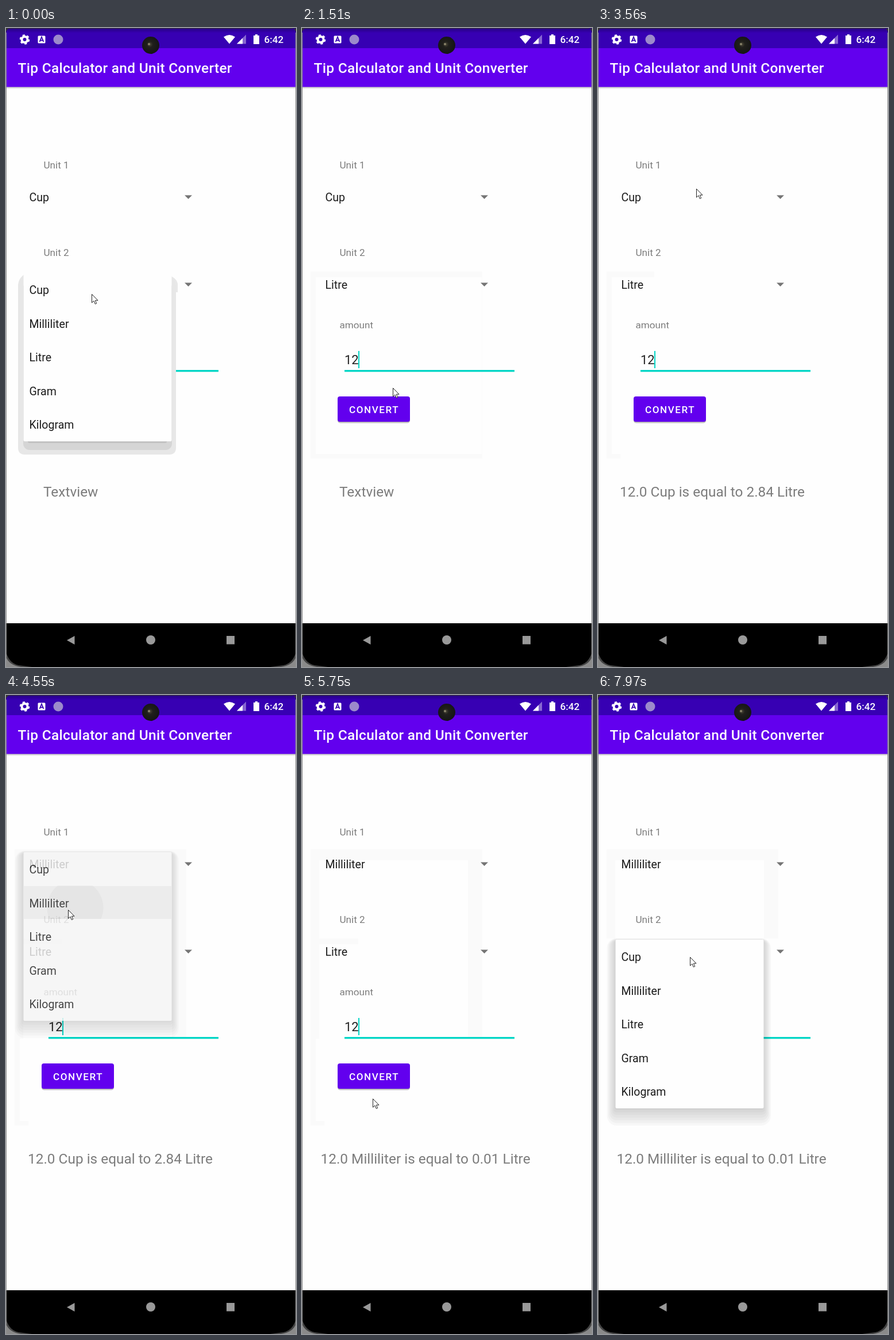
These frames come from a looping animation (505 by 1110 pixels, 8000 ms). An HTML page:

```html
<!DOCTYPE html>
<html lang="en">
<head>
<meta charset="utf-8">
<title>Unit converter</title>
<style>
  html, body { margin: 0; width: 100%; height: 100%; overflow: hidden; background: #fefefe; }
  svg { display: block; }
  text { font-family: Roboto, sans-serif; white-space: pre; }
  .title { font-size: 24.46px; font-weight: 500; letter-spacing: .0125em; fill: #fff; }
  .clock { font-size: 17.1px; font-weight: 500; fill: #fff; }
  .label { font-size: 17.1px; fill: #7c7c7c; }
  .item { font-size: 19.57px; fill: #1c1c1c; }
  .result { font-size: 24.4px; fill: #7c7c7c; }
  .amount { font-size: 22px; fill: #222; }
  .button { font-size: 17.1px; font-weight: 500; letter-spacing: .0892em; fill: #fff; }
  .trace { fill: #fafafa; fill-rule: evenodd; }
  .blank { fill: #fefefe; }
  .soft rect { fill: #000; fill-opacity: .028; }
</style>
</head>
<body>
<svg id="stage" width="100%" height="100%" viewBox="0 0 505 1110">
  <defs>
    <linearGradient id="drop" x2="0" y2="1">
      <stop stop-color="#b8b8b8"/><stop offset="1" stop-color="#fefefe"/>
    </linearGradient>
    <linearGradient id="status" x2="0" y2="1">
      <stop stop-color="#250080"/><stop offset=".25" stop-color="#3700b3"/>
    </linearGradient>
    <radialGradient id="lens" cx=".45" cy=".45">
      <stop stop-color="#4a4638"/><stop offset=".35" stop-color="#201f1b"/><stop offset="1" stop-color="#161616"/>
    </radialGradient>
    <clipPath id="labelClip"><rect x="60" y="500" width="80" height="21.5"/></clipPath>
    <clipPath id="buttonClip"><rect x="62" y="640" width="126" height="44" rx="4"/></clipPath>
  </defs>

  <rect width="505" height="1110" fill="#fefefe"/>

  <!-- faint residue left by closed menus -->
  <path id="trace2" class="trace" d="M15 423H314V748H15ZM24 433H313V740H24Z"/>
  <rect id="wipeText" class="blank" x="39" y="560" width="320" height="260"/>
  <rect id="wipePath" class="blank" x="98" y="279" width="256" height="639"/>
  <path id="trace1" class="trace" d="M15 268H314V597H15ZM30 287H289V597H30Z"/>
  <rect id="wipeMenu" class="blank" x="14" y="423" width="302" height="328"/>

  <!-- status and app bars -->
  <rect y="102" width="505" height="4" fill="url(#drop)"/>
  <rect y="34" width="505" height="68.4" fill="#6200ee"/>
  <rect width="505" height="35" fill="url(#status)"/>
  <path d="M0 0H505V1H0ZM0 0H6Q1 2 0 8ZM505 0H499Q504 2 505 8Z" fill="#333"/>
  <g fill="#fff">
    <circle cx="32.5" cy="20" r="5" fill="none" stroke="#fff" stroke-width="4"/>
    <circle cx="32.5" cy="20" r="7.3" fill="none" stroke="#fff" stroke-width="3" stroke-dasharray="3.9 3.745"/>
    <rect x="55.5" y="13.5" width="13" height="13" rx="1.5"/>
    <path d="M58.5 24 62 15.5 65.5 24M60 21.5h4" fill="none" stroke="#3700b3" stroke-width="1.8"/>
    <circle cx="91" cy="20" r="8.5" fill="#9c8acb"/>
    <path d="M379 15.5Q389 8.5 399 15.5L389 27.5Z"/>
    <path d="M402 27.5 418 11.5V27.5Z" opacity=".4"/>
    <path d="M402 27.5 412 17.5V27.5Z"/>
    <path d="M431 13h3v-2h4v2h3v15h-10z"/>
  </g>
  <text class="clock" x="449.5" y="26">6:42</text>
  <circle cx="252" cy="30" r="15" fill="url(#lens)"/>
  <circle cx="249" cy="28" r="2" fill="#8a846a"/>
  <text class="title" x="20.5" y="78">Tip Calculator and Unit Converter</text>

  <!-- form -->
  <text class="label" x="65.5" y="244">Unit 1</text>
  <text class="label" x="65.5" y="396">Unit 2</text>
  <text class="label" x="65.5" y="522" clip-path="url(#labelClip)">amount</text>
  <text id="unit1" class="item" x="40.5" y="301"></text>
  <text id="unit2" class="item" x="40.5" y="453"></text>
  <path id="arrow1" d="M311 290.5h13l-6.5 6.5z"/>
  <path id="arrow2" d="M311 442.5h13l-6.5 6.5z"/>
  <text id="amount" class="amount" x="74" y="584"></text>
  <rect x="74" y="594" width="296" height="3.3" fill="#03d6c6"/>
  <rect id="caret" y="561" width="2" height="30" fill="#03d6c6"/>
  <rect x="62" y="643" width="126" height="44" rx="5" opacity=".1"/>
  <rect x="62" y="642" width="126" height="43.5" rx="4" opacity=".22"/>
  <rect x="62" y="640" width="126" height="44" rx="4" fill="#6200ee"/>
  <g id="ripple" clip-path="url(#buttonClip)" fill="#fff">
    <rect x="62" y="640" width="126" height="44" opacity=".34"/>
    <circle id="wave" cx="125" cy="662" opacity=".16"/>
  </g>
  <text class="button" x="82" y="668.5">CONVERT</text>
  <text id="result" class="result" y="813.5"></text>

  <!-- drop-down list, placed for the lower spinner -->
  <g id="menu">
    <g id="hardShadow">
      <path d="M285 430Q299 436 299 446V459H285Z" fill="#e8e8e8"/>
      <path d="M35 426Q21 434 21 448V729Q21 741 33 741H284Q296 741 296 729V448Q296 440 285 430Z" fill="#e7e7e7"/>
      <rect x="30" y="440" width="259" height="293" rx="11" fill="#d5d5d5"/>
      <rect x="38" y="440" width="242" height="281" rx="3" fill="#c2c2c2"/>
    </g>
    <g id="softShadow" class="soft"></g>
    <rect id="panel" x="30.5" y="425" width="258" height="293" rx="2"/>
    <svg id="row" x="30.5" width="258" height="57.5">
      <rect width="258" height="58" fill="#e9e9e9"/>
      <circle id="rowWave" cx="90" cy="38" fill="#e0e0e0"/>
    </svg>
    <g id="items"></g>
  </g>

  <!-- navigation bar and device edge -->
  <rect y="1034" width="505" height="76"/>
  <path d="M0 1084Q6 1104 22 1107L45 1110H0ZM505 1084Q499 1104 483 1107L460 1110H505Z" fill="#444"/>
  <path d="M0 1092Q5 1107 26 1110H0ZM505 1092Q500 1107 479 1110H505Z" fill="#8a8a8a"/>
  <path d="M.5 8V1110M504.5 8V1110" stroke="#8f8f8f"/>
  <g fill="#999">
    <path d="M106 1063.5 119.5 1056V1071Z"/>
    <circle cx="252" cy="1063" r="8"/>
    <rect x="384" y="1056" width="14" height="14.5"/>
  </g>

  <path id="cursor" d="M.5.5V15.2L4 12 6.3 17.5 8.7 16.5 6.4 11.2H11Z" fill="#fff" stroke="#222"/>
</svg>
<script>
const LOOP = 8000, PITCH = 58.6, BLINK = 504;
const TYPED = 1510, PRESSES = [1900, 5150], PRESS_TO_RESULT = 120;

const MENUS = [
  { open: -200, press: 480, close: 550, row: 2, shift: 0 },
  { open: 3720, press: 4310, close: 4500, row: 1, shift: -152 },
  { open: 7000, press: LOOP, close: LOOP, row: 0, shift: 0 }
];
// Each glide of the pointer; it rests in between.
const GLIDES = [
  { from: 0, to: 400, x: 197, y: 575 },
  { from: 1300, to: 1690, x: 124, y: 667 },
  { from: 2170, to: 2410, x: 184, y: 705 },
  { from: 2530, to: 2780, x: 343, y: 900, hidden: true },
  { from: 2780, to: 3410, x: 171, y: 279 },
  { from: 3800, to: 4190, x: 108, y: 372 },
  { from: 4550, to: 5030, x: 123, y: 667 },
  { from: 5510, to: 6020, x: 123, y: 739 },
  { from: 6020, to: 6320, x: 171, y: 809 },
  { from: 6320, to: 6800, x: 178, y: 449 },
  { from: 7100, to: 7580, x: 129, y: 648 },
  { from: 7580, to: 7970, x: 160, y: 455 }
];

const $ = id => document.getElementById(id);
const set = (id, attrs) => Object.entries(attrs).forEach(([k, v]) => $(id).setAttribute(k, v));
const show = (id, on) => { $(id).style.display = on ? '' : 'none'; };
const clamp = v => Math.max(0, Math.min(1, v));

$('items').innerHTML = ['Cup', 'Milliliter', 'Litre', 'Gram', 'Kilogram'].map((name, i) =>
  `<text class="item" x="40.5" y="${462 + i * PITCH}">${name}</text>`).join('');
$('softShadow').innerHTML = Array.from({ length: 7 }, (_, i) => {
  const d = 15 - i * 2.3;
  return `<rect x="${30.5 - d}" y="${427 - d * .3}" width="${257 + d * 1.9}" height="${291 + d * 2.3}" rx="${d + 2}"/>`;
}).join('');

function drawMenu(t) {
  const { open, press, close, row, shift } = MENUS.filter(m => m.open <= t).pop();
  const alpha = Math.min(clamp((t - open) / 200), clamp(1 - (t - close) / 270));
  set('menu', { opacity: alpha, transform: `translate(0 ${shift})` });
  set('panel', { fill: t > close ? '#f5f5f5' : '#fefefe' });
  show('hardShadow', open < 0);
  show('softShadow', open > 0);
  show('row', t >= press);
  set('row', { y: 425 + PITCH * row });
  set('rowWave', { r: 25 + 24 * clamp((t - press) / 240) });
}

function drawButton(t) {
  const since = t - PRESSES[t < PRESSES[1] ? 0 : 1];
  set('ripple', { opacity: Math.min(clamp(since / 100), clamp(1 - (since - 140) / 420)) });
  set('wave', { r: 25 + 95 * clamp(since / 560) });
}

function drawForm(t) {
  const [, upper, second] = MENUS;
  $('unit1').textContent = t < upper.press ? 'Cup' : 'Milliliter';
  $('unit2').textContent = t < MENUS[0].close ? 'Cup' : 'Litre';
  const tint = menu => t > menu.open - 100 && t < menu.open + 60 ? '#03d6c6' : '#757575';
  set('arrow1', { fill: tint(upper) });
  set('arrow2', { fill: tint(second) });

  const typed = t >= TYPED;
  $('amount').textContent = typed ? '12' : '';
  set('caret', { x: typed ? 98 : 74 });
  show('caret', typed ? Math.floor((t - TYPED) / BLINK) % 2 === 0 : t < 1090);

  const done = PRESSES.filter(p => t >= p + PRESS_TO_RESULT).length;
  $('result').textContent = ['Textview', '12.0 Cup is equal to 2.84 Litre',
    '12.0 Milliliter is equal to 0.01 Litre'][done];
  set('result', { x: [65, 38, 32.5][done] });
}

function drawCursor(t) {
  const i = GLIDES.findLastIndex(g => g.from <= t);
  const start = GLIDES[i - 1] || { x: 149, y: 462 }, end = GLIDES[i];
  const p = clamp((t - end.from) / (end.to - end.from));
  const mix = axis => Math.round(start[axis] + (end[axis] - start[axis]) * p);
  set('cursor', { transform: `translate(${mix('x')} ${mix('y')})` });
  show('cursor', !end.hidden);
}

function draw(t) {
  show('trace2', t >= MENUS[0].close);
  show('wipeText', t >= PRESSES[0] + PRESS_TO_RESULT);
  show('wipePath', t >= 3170);
  show('trace1', t >= MENUS[1].open + 200);
  show('wipeMenu', t >= MENUS[2].open);
  drawForm(t);
  drawButton(t);
  drawMenu(t);
  drawCursor(t);
}

const begin = performance.now();
function tick() {
  draw((performance.now() - begin) % LOOP);
  requestAnimationFrame(tick);
}
tick();
</script>
</body>
</html>
```
